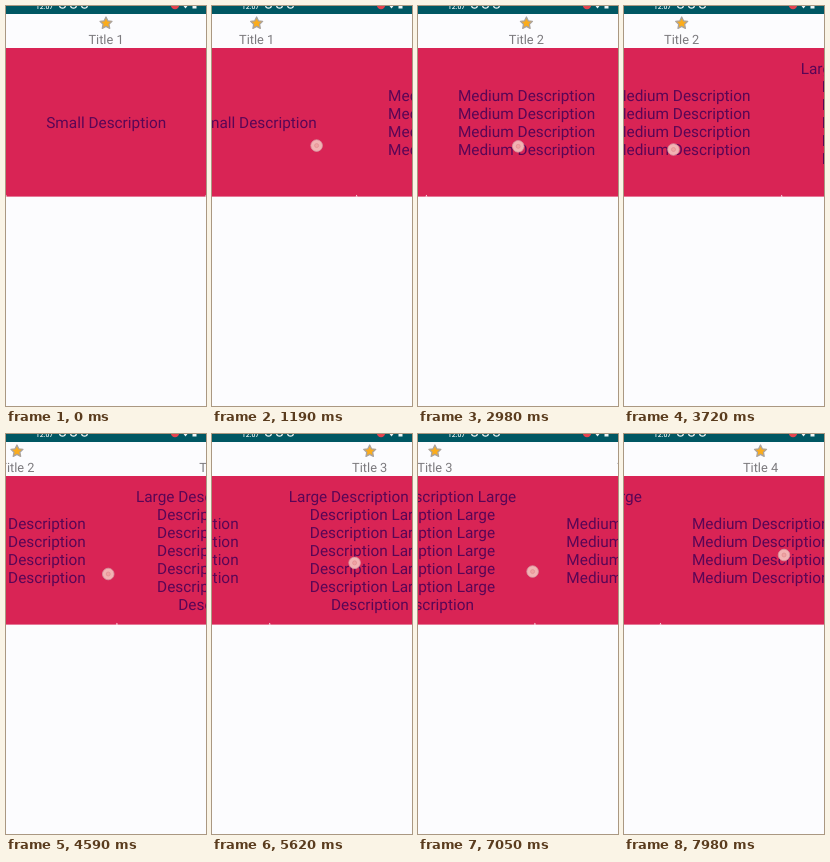
An HTML page that plays this animation: 200 by 400 pixels, repeating every 8000 ms.

```html
<!DOCTYPE html>
<html lang="en">
<head>
<meta charset="utf-8">
<title>Swipeable cards</title>
<style>
  html, body { margin: 0; width: 100%; height: 100%; overflow: hidden; background: #fcfcfe; }
  svg { display: block; width: 100vw; height: 100vh; }
  text { font-family: Roboto, "Liberation Sans", sans-serif; text-anchor: middle; text-rendering: geometricPrecision; }
  .title { font-size: 12.8px; fill: #7c7a7e; }
  .body { font-size: 15.36px; fill: #5a0656; }
  .clock { font-size: 6.9px; font-weight: 500; fill: #eef5f6; }
</style>
</head>
<body>
<svg viewBox="0 0 200 400">
  <rect width="200" height="400" fill="#fcfcfe"/>
  <rect y="42" width="200" height="148.6" fill="#d92455"/>
  <g id="strip"></g>
  <g id="status" fill="#eef5f6">
    <rect width="200" height="8" fill="#005763"/>
    <text class="clock" x="38.5" y="2.7">12:07</text>
  </g>
  <g id="touch">
    <circle r="5.8" fill="#f2b3b3" stroke="#d595a0" stroke-width=".8"/>
    <circle r="2" fill="#f0a2a2" stroke="#e08f92" stroke-width=".7"/>
  </g>
</svg>
<script>
const LOOP = 8000, PAGE = 200, LINE = 18, CARD_BOTTOM = 190.6;
const byId = id => document.getElementById(id);
const strip = byId('strip'), status_ = byId('status'), touch = byId('touch');
const clamp = (v, lo, hi) => Math.min(hi, Math.max(lo, v));

function add(parent, tag, attrs, text) {
  const el = document.createElementNS('http://www.w3.org/2000/svg', tag);
  for (const key in attrs) el.setAttribute(key, attrs[key]);
  if (text) el.textContent = text;
  parent.appendChild(el);
}

function starPoints(cx, cy, outer, inner) {
  return Array.from({ length: 10 }, (_, i) => {
    const r = i % 2 ? inner : outer, a = i * Math.PI / 5 - Math.PI / 2;
    return [cx + r * Math.cos(a), cy + r * Math.sin(a)].join(',');
  }).join(' ');
}

// Status icons, cut off by the top edge
for (let i = 0; i < 3; i++) {
  add(status_, 'circle', { cx: 56.5 + 11 * i, cy: -0.7, r: 2.9, fill: 'none', stroke: '#eef5f6', 'stroke-width': 1.2 });
}
add(status_, 'circle', { cx: 169, cy: -1, r: 4.2, fill: '#e5434f' });
add(status_, 'path', { d: 'M176 -2h7l-3.5 4.5z' });
add(status_, 'rect', { x: 186.5, y: -4, width: 4, height: 6.5 });

const medium = Array(4).fill('Medium Description');
const large = ['Large Description Large', ...Array(5).fill('Description Large'), 'Description'];

[['Small Description'], medium, large, medium].forEach((lines, i) => {
  const g = add.call(null, strip, 'g', { transform: `translate(${i * PAGE})` }) || strip.lastChild;
  add(g, 'polygon', {
    points: starPoints(100, 17.3, 6.3, 3.1), fill: '#fbac1c',
    stroke: '#aaa39e', 'stroke-width': 1.3, 'stroke-linejoin': 'round'
  });
  add(g, 'text', { class: 'title', x: 100, y: 38.4 }, 'Title ' + (i + 1));
  // Notch left by the rounded corners of two neighbouring cards
  add(g, 'path', { d: `M-1 ${CARD_BOTTOM}L0 ${CARD_BOTTOM - 1.8}L1 ${CARD_BOTTOM}z`, fill: '#fcfcfe' });
  lines.forEach((line, n) => {
    const y = 122.3 + (n - (lines.length - 1) / 2) * LINE;
    add(g, 'text', { class: 'body', x: 100.2, y }, line);
  });
});

// Times when the finger holds still: [from, to]
const rests = [[0, 40], [530, 1050], [2160, 2490], [3720, 3910], [5160, 5390], [7800, LOOP]];
const moving = t => rests.reduce((sum, [from, to]) => sum - clamp(t - from, 0, to - from), t);

// Key points of the scroll: [time, distance]
const keys = [[0, 0], [1810, 109.7], [2980, 191.5], [4590, 289], [5620, 342.2], [7050, 483], [7800, 563.5]]
  .map(([t, s]) => [moving(t), s]);

function scrollAt(t) {
  const m = moving(t);
  const i = clamp(keys.findIndex(([k]) => m <= k), 1, keys.length - 1);
  const [m0, s0] = keys[i - 1], [m1, s1] = keys[i];
  return s0 + (s1 - s0) * (m - m0) / (m1 - m0);
}

// Each new grip: [time, finger x]; it then travels with the strip
const grips = [[40, 160], [2490, 148], [3910, 149], [5390, 158], [6590, 160], [7240, 160], [7960, 160]];
const LIFT = 20;

function draw(t) {
  const s = scrollAt(t);
  strip.setAttribute('transform', `translate(${-s})`);
  const grip = grips.filter(([time]) => t >= time).pop();
  const down = grip && t >= grip[0] + LIFT;
  touch.setAttribute('visibility', down ? 'visible' : 'hidden');
  if (!down) return;
  const x = grip[1] - (s - scrollAt(grip[0]));
  const y = 143.5 - 22.5 * Math.max(0, (x - 50) / 110) ** 2.5;
  touch.setAttribute('transform', `translate(${x} ${y})`);
}

const start = performance.now();
function tick() {
  draw((performance.now() - start) % LOOP);
  requestAnimationFrame(tick);
}
tick();
</script>
</body>
</html>
```
